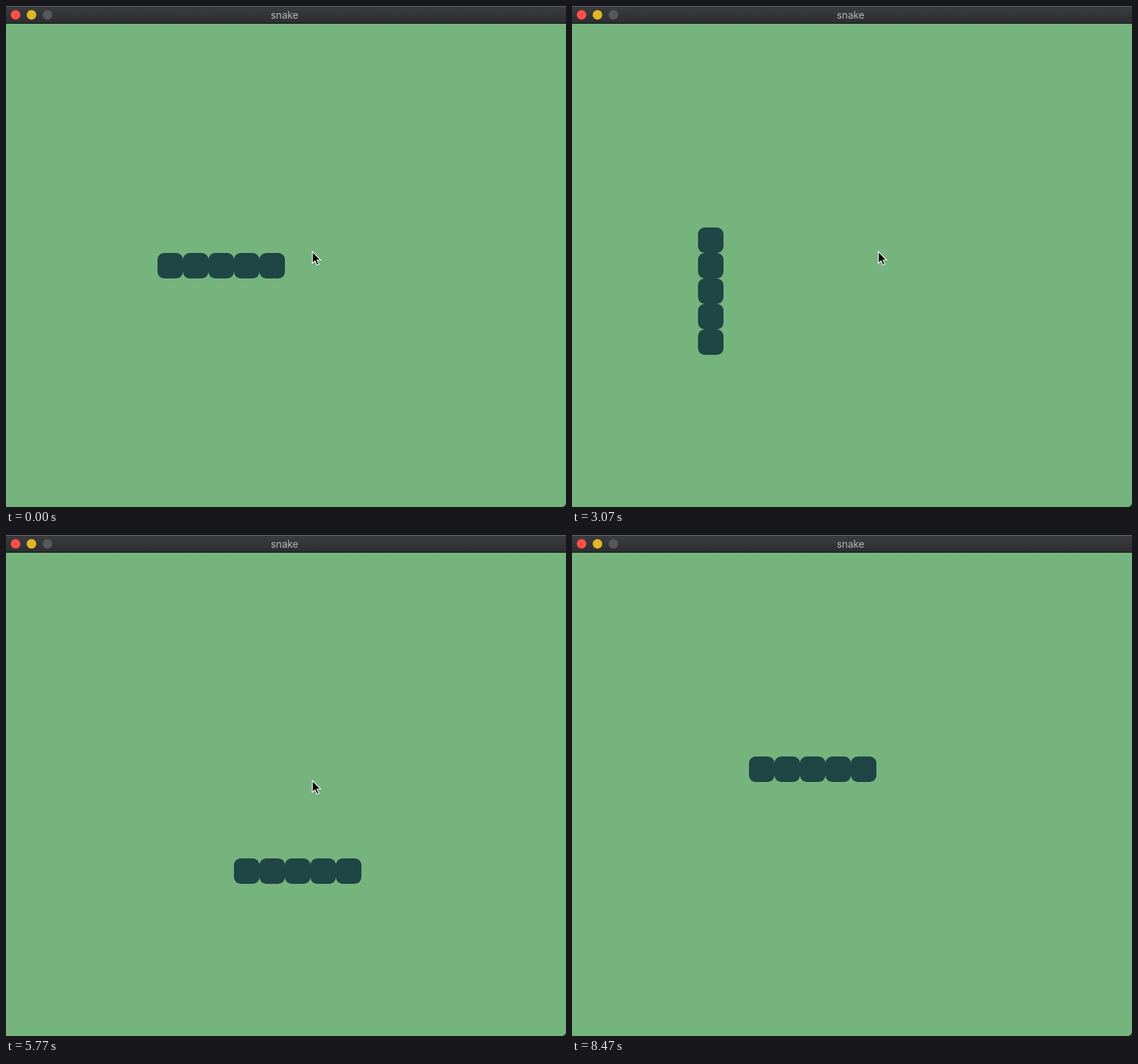
An HTML page that plays this animation: 791x708 px, repeating every 8.56 s.

```html
<!DOCTYPE html>
<html lang="en">
<head>
<meta charset="utf-8">
<title>snake</title>
<style>
  html, body { margin: 0; width: 100%; height: 100%; overflow: hidden; background: #76b47e; }
  svg { display: block; width: 791px; height: 708px; }
  text { font: 14px Inter, sans-serif; fill: #b6b7b8; text-anchor: middle; }
</style>
</head>
<body>
<svg viewBox="0 0 791 708">
  <defs>
    <linearGradient id="bar" x2="0" y2="1">
      <stop stop-color="#3c3d40"/>
      <stop offset="1" stop-color="#2c2d2f"/>
    </linearGradient>
  </defs>
  <rect width="791" height="708" fill="#76b47e"/>
  <rect width="791" height="25" fill="url(#bar)"/>
  <rect width="791" height="1" fill="#67686a"/>
  <rect y="24" width="791" height="1" fill="#0c0d0d"/>
  <circle cx="13.5" cy="12.5" r="6.8" fill="#fd4f48"/>
  <circle cx="36" cy="12.5" r="6.8" fill="#e1b726"/>
  <circle cx="58.5" cy="12.5" r="6.8" fill="#58585a"/>
  <text x="393.5" y="18">snake</text>
  <path d="M791 703v5h-5q4-1 5-5" fill="#16241a"/>
  <g id="snake" fill="#1f4545"></g>
  <g id="cursor">
    <path d="M0 .8v17l4-3.7 2.6 6 3-1.3-2.6-5.8h5.5z" fill="#000" opacity=".2" transform="translate(.3 1)"/>
    <path d="M0 0v16.6l3.8-3.6 2.7 6.2 2.8-1.2-2.7-6h5.1z" fill="#000" stroke="#fff" stroke-width="1.2"/>
  </g>
</svg>
<script>
const LOOP = 8560, LENGTH = 5, CELL = 36, LEFT = 178, TOP = 241;
const DIRS = { R: [1, 0], L: [-1, 0], U: [0, -1], D: [0, 1] };

// Head positions, starting with the resting body laid out to the right.
const route = [[1, 3]];
for (const [, dir, count] of 'R5 U3 L6 D6 R9 L9 U4 R6'.matchAll(/(\w)(\d)/g)) {
  for (let i = 0; i < count; i++) {
    const [x, y] = route.at(-1), [dx, dy] = DIRS[dir];
    route.push([x + dx, y + dy]);
  }
}

// Moves tick every 5.77 ticks of a 30 Hz clock, rounded to 10 ms.
const clock = tick => Math.round(tick * 10 / 3) * 10;
const moves = Array.from({ length: route.length - LENGTH },
  (_, i) => clock(Math.floor(0.375 + 5.77 * (i + 1))));

const pointer = [[0, 432.8, 347.2], [7900, 466, 275], [7930, 533, 130], [7970, 640, -90]];

const snake = document.getElementById('snake');
const cursor = document.getElementById('cursor');
const cells = Array.from({ length: LENGTH }, () => {
  const cell = document.createElementNS('http://www.w3.org/2000/svg', 'rect');
  cell.setAttribute('width', CELL);
  cell.setAttribute('height', CELL);
  cell.setAttribute('rx', 9.5);
  return snake.appendChild(cell);
});

function draw(t) {
  const step = moves.filter(m => m <= t).length;
  cells.forEach((cell, i) => {
    const [x, y] = route[step + i];
    cell.setAttribute('x', LEFT + x * CELL);
    cell.setAttribute('y', TOP + y * CELL);
  });
  const [, x, y] = pointer.findLast(p => p[0] <= t);
  cursor.setAttribute('transform', `translate(${x} ${y})`);
}

const start = performance.now();
function frame() {
  draw((performance.now() - start) % LOOP);
  requestAnimationFrame(frame);
}
frame();
</script>
</body>
</html>
```
